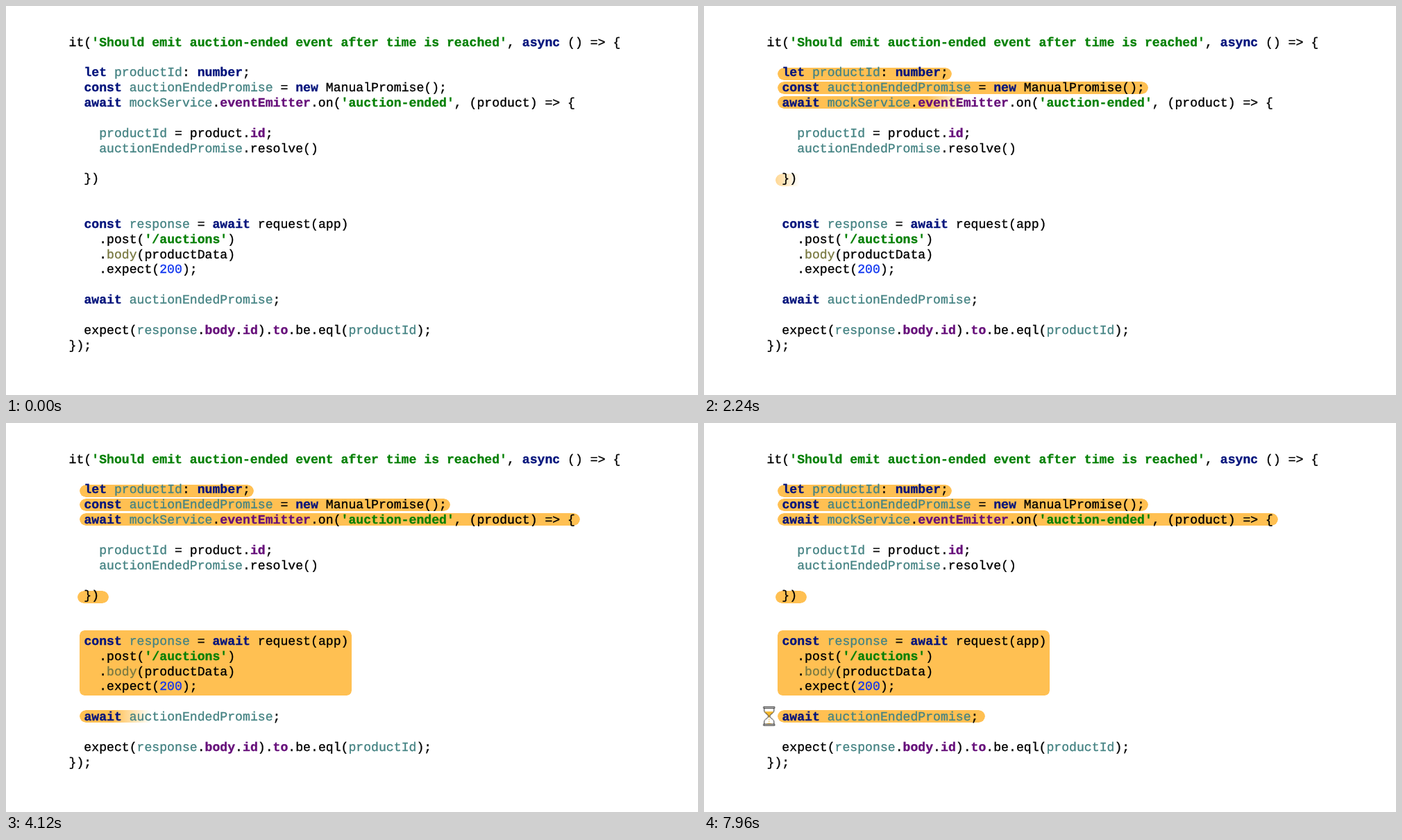
Animation, 997 px wide and 561 px high, one loop 8000 ms. Source, as an HTML page:

```html
<!DOCTYPE html>
<html lang="en">
<head>
<meta charset="utf-8">
<title>Auction test walkthrough</title>
<style>
html, body { margin: 0; width: 100%; height: 100%; overflow: hidden; background: #fff; }
body { position: relative; }

pre {
  position: absolute; left: 90.6px; top: 43.7px; margin: 0;
  font: 18.15px/21.85px "Liberation Mono", "Courier New", monospace;
  color: #000; text-rendering: geometricPrecision;
  -webkit-text-stroke: .35px currentColor;
}
b { font-weight: 700; color: #04147c; }
.s { color: #068006; }
.p { color: #660e7a; }
i { font-style: normal; color: #458383; }
.f { color: #7a7a43; }
.n { color: #0f35f0; }

/* Highlights are revealed by sliding a soft-edged mask to the right */
.mark {
  --soft: 55px;
  position: absolute; left: 105.5px; top: var(--y); width: var(--w); height: 18px;
  border-radius: 9px; background: #ffc052;
  mask: linear-gradient(90deg, #000 calc(100% - var(--soft)), transparent) no-repeat;
  mask-size: calc(100% + var(--soft)) 100%;
  --away: calc(-1 * var(--w) - var(--soft) - 1px);
  animation: 8s linear infinite;
}
.m1 { animation-name: wipe1; }
.m2 { animation-name: wipe2; }
.m3 { animation-name: wipe3; }
.m4 { animation-name: wipe4; }
.m5 { animation-name: wipe5; }
.brace { left: 103px; }
.block { height: 94px; border-radius: 7px; }
@keyframes wipe1 { 0% { mask-position: var(--away) 0 } 11.5%, 100% { mask-position: 0 0 } }
@keyframes wipe2 { 0%, 12.125% { mask-position: var(--away) 0 } 23.625%, 100% { mask-position: 0 0 } }
@keyframes wipe3 { 0%, 24% { mask-position: var(--away) 0 } 35.45%, 100% { mask-position: 0 0 } }
@keyframes wipe4 { 0%, 36.25% { mask-position: var(--away) 0 } 47.75%, 100% { mask-position: 0 0 } }
@keyframes wipe5 { 0%, 48.125% { mask-position: var(--away) 0 } 59.625%, 100% { mask-position: 0 0 } }

/* Hourglass: grows in, then flips and drains every 1160 ms */
.stage { position: absolute; left: 0; top: 0; }
.pop { animation: pop 8s linear infinite; }
.flip { animation: flip 8s linear infinite; }
.top { animation: drain 8s linear infinite; }
.pile { animation: fill 8s linear infinite; }
.stream { animation: stream 8s step-end infinite; }
@keyframes pop {
  0%, 60% { transform: scale(0); animation-timing-function: ease-out }
  72.5%, 100% { transform: scale(1) }
}
/* The glass is symmetric, so a half turn jumps from 90 to -90 degrees */
@keyframes flip {
  0%, 62.5% { transform: rotate(0deg) }
  64.375% { transform: rotate(90deg) }
  64.376% { transform: rotate(-90deg) }
  66.25%, 77% { transform: rotate(0deg) }
  78.875% { transform: rotate(90deg) }
  78.876% { transform: rotate(-90deg) }
  80.75%, 91.5% { transform: rotate(0deg) }
  93.375% { transform: rotate(90deg) }
  93.376% { transform: rotate(-90deg) }
  95.25%, 100% { transform: rotate(0deg) }
}
@keyframes drain {
  0%, 64.375% { transform: translateY(11px) }
  64.376% { transform: translateY(0) }
  66.25% { transform: translateY(0); animation-timing-function: ease-in }
  75%, 78.875% { transform: translateY(11px) }
  78.876% { transform: translateY(0) }
  80.75% { transform: translateY(0); animation-timing-function: ease-in }
  89.5%, 93.375% { transform: translateY(11px) }
  93.376% { transform: translateY(0) }
  95.25% { transform: translateY(0); animation-timing-function: ease-in }
  100% { transform: translateY(4.2px) }
}
@keyframes fill {
  0%, 64.375% { transform: translateY(0) }
  64.376%, 66.25% { transform: translateY(7px) }
  75%, 78.875% { transform: translateY(0) }
  78.876%, 80.75% { transform: translateY(7px) }
  89.5%, 93.375% { transform: translateY(0) }
  93.376%, 95.25% { transform: translateY(7px) }
  100% { transform: translateY(5px) }
}
@keyframes stream {
  0% { opacity: 0 }
  66.25% { opacity: 1 }
  75% { opacity: 0 }
  80.75% { opacity: 1 }
  89.5% { opacity: 0 }
  95.25%, 100% { opacity: 1 }
}
</style>
</head>
<body>
<div class="mark m1" style="--y:88.5px;--w:251.5px"></div>
<div class="mark m2" style="--y:109.3px;--w:534.5px"></div>
<div class="mark m3" style="--y:130.3px;--w:721.5px"></div>
<div class="mark m3 brace" style="--y:241.8px;--w:45px"></div>
<div class="mark m4 block" style="--y:299px;--w:392px"></div>
<div class="mark m5" style="--y:413.8px;--w:299.5px"></div>

<pre>it(<b class="s">'Should emit auction-ended event after time is reached'</b>, <b>async</b> () =&gt; {

  <b>let</b> <i>productId</i>: <b>number</b>;
  <b>const</b> <i>auctionEndedPromise</i> = <b>new</b> ManualPromise();
  <b>await</b> <i>mockService</i>.<b class="p">eventEmitter</b>.on(<b class="s">'auction-ended'</b>, (product) =&gt; {

    <i>productId</i> = product.<b class="p">id</b>;
    <i>auctionEndedPromise</i>.resolve()

  })


  <b>const</b> <i>response</i> = <b>await</b> request(app)
    .post(<b class="s">'/auctions'</b>)
    .<i class="f">body</i>(productData)
    .expect(<i class="n">200</i>);

  <b>await</b> <i>auctionEndedPromise</i>;

  expect(<i>response</i>.<b class="p">body</b>.<b class="p">id</b>).<b class="p">to</b>.be.eql(<i>productId</i>);
});</pre>

<svg class="stage" width="997" height="561" viewBox="0 0 997 561">
  <defs>
    <path id="glass" d="M-7-11.5V-8C-7-4-1-3-1 0S-7 4-7 8V11.5H7V8C7 4 1 3 1 0S7-4 7-8V-11.5Z"/>
    <clipPath id="inside"><use href="#glass"/></clipPath>
    <clipPath id="upper"><rect x="-8" y="-12" width="16" height="12.5"/></clipPath>
  </defs>
  <g transform="translate(93.7 422.8)">
    <g class="pop"><g class="flip">
      <use href="#glass" fill="#fff"/>
      <g clip-path="url(#inside)" fill="#f7b92b">
        <g clip-path="url(#upper)"><rect class="top" x="-8" y="-10.5" width="16" height="12"/></g>
        <path class="pile" d="M-8 13V8Q0 2 8 8V13Z"/>
        <path class="stream" d="M0 1V11" stroke="#f7b92b" stroke-width="1.2" stroke-dasharray="1.5 1.5"/>
      </g>
      <use href="#glass" fill="none" stroke="#222"/>
      <path d="M-8-13.5H8V-11.5H-8ZM-8 11.5H8V13.5H-8Z" fill="#fff" stroke="#222"/>
    </g></g>
  </g>
</svg>
</body>
</html>
```
